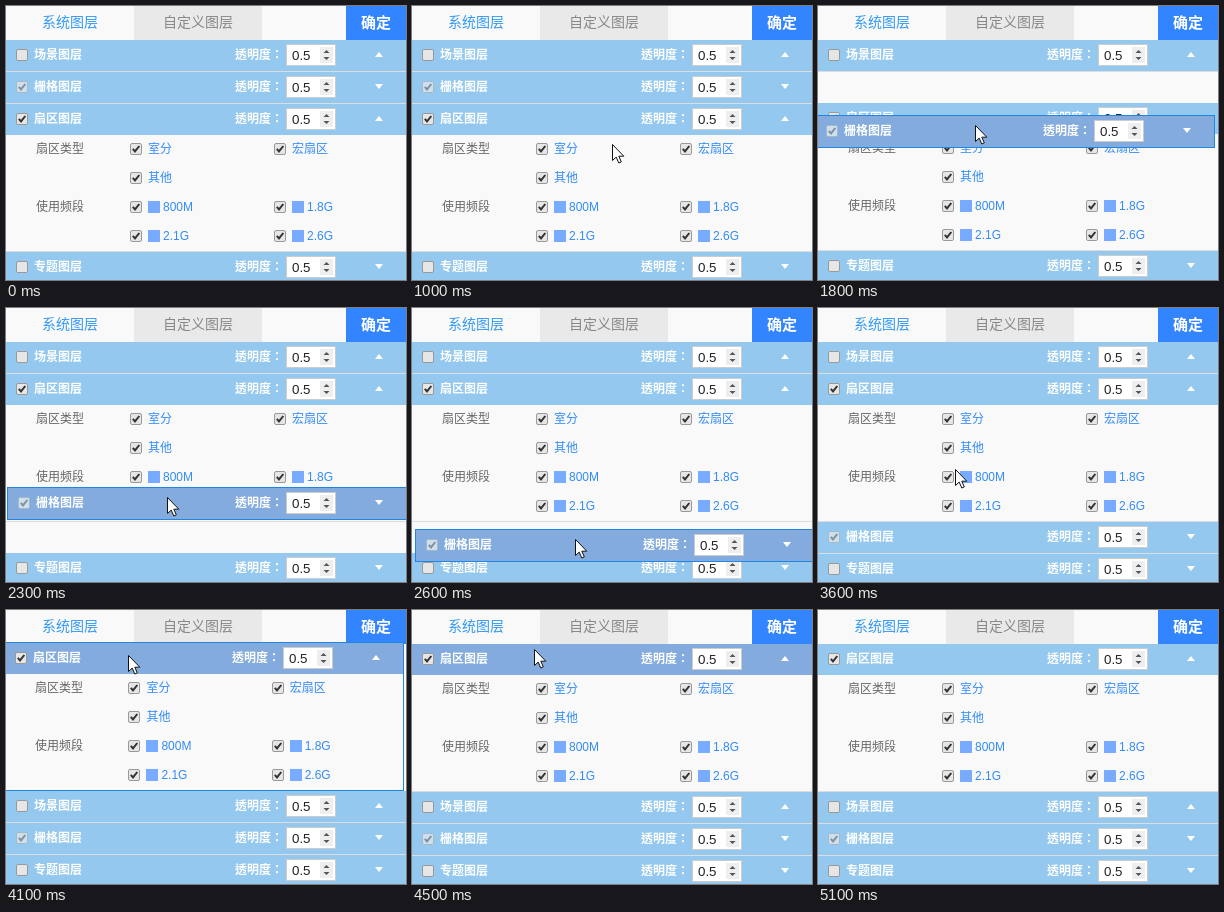
An HTML page for the animation above (5600 ms loop, 400 px wide and 274 px high).

```html
<!DOCTYPE html>
<html lang="zh-CN">
<head>
<meta charset="utf-8">
<style>
html, body { margin: 0; width: 100%; height: 100%; overflow: hidden; }
body { background: #f9f9f9; font: 12px "Liberation Sans", "Noto Sans CJK SC", sans-serif; }
#stage { position: relative; width: 400px; height: 274px; overflow: hidden; cursor: default; }
#stage * { position: absolute; box-sizing: border-box; white-space: nowrap; }
.tab { top: 0; height: 34px; line-height: 33px; text-align: center; font-size: 14px; }
.item { width: 400px; border-bottom: 1px solid #ddd; background: #f9f9f9; }
.head { left: 0; right: 0; top: 0; height: 31px; line-height: 31px; background: #94c8ee; color: #fff; font-weight: bold; }
.hover .head { background: #83abdd; }
.drag { border: 1px solid #2286e0; z-index: 1; }
.name { left: 28px; }
.alpha { right: 123px; }
.num { right: 70px; top: 4px; width: 50px; height: 22px; border: 1px solid #ccc; background: #fff;
  color: #222; font: 13.33px/21px "Liberation Sans", sans-serif; padding-left: 5px; }
.spin { right: 2px; top: 2px; width: 13px; height: 16px; background: #eee; }
.fold { right: 23px; top: 12px; width: 8px; height: 5px; fill: #fff; }
.panel { left: 0; right: 0; top: 31px; height: 116px; line-height: 29px; color: #666; }
.opt { color: #338cf5; height: 29px; }
.chip { left: 18px; top: 8px; width: 12px; height: 12px; background: #76abff; }
.box { width: 12px; height: 12px; }
#cursor { width: 14px; height: 21px; z-index: 2; }
</style>
</head>
<body>
<div id="stage">
  <div class="tab" style="left:0;width:128px;color:#3399f3">系统图层</div>
  <div class="tab" style="left:128px;width:128px;background:#e9e9e9;color:#888">自定义图层</div>
  <div class="tab" style="left:340px;width:60px;background:#3385ff;color:#fff;font-size:15px;font-weight:bold">确定</div>
  <svg id="cursor" viewBox="-.5 -.5 14 21"><path d="M0 0V16L3.7 12.6 6.3 18.5 8.8 17.4 6.3 11.7H11.3Z" fill="#fff" stroke="#111"/></svg>
</div>
<script>
const stage = document.getElementById('stage'), cursor = document.getElementById('cursor');
const LOOP = 5600, STEP = 100, TOP = 34, HEAD = 31, LINE = 29;

const box = (x, y, on, off) => `<svg class="box" style="left:${x}px;top:${y}px" viewBox="0 0 12 12">
  <rect x=".5" y=".5" width="11" height="11" rx="1.5" fill="${off ? '#cfdfeb' : '#e6e6e6'}" stroke="${off ? '#a3b9c9' : '#999'}"/>
  ${on ? `<path d="M2.8 5.8L5 8.4 9.3 3" fill="none" stroke="${off ? '#7f919e' : '#333'}" stroke-width="2"/>` : ''}</svg>`;

// Options fill two columns; the bands in the lower rows carry a colour chip
const options = ['室分', '宏扇区', '其他', '', '800M', '1.8G', '2.1G', '2.6G'];
const option = (text, i) => text && `<div class="opt" style="left:${i % 2 ? 67 : 31}%;top:${(i >> 1) * LINE}px">
  ${box(0, 8, true)}${i > 3 ? '<i class="chip"></i>' : ''}<span style="left:${i > 3 ? 33 : 18}px">${text}</span></div>`;
const panel = `<div class="panel"><span style="left:30px">扇区类型</span>
  <span style="left:30px;top:${2 * LINE}px">使用频段</span>${options.map(option).join('')}</div>`;

function item(name, { on, off, up, open }) {
  const el = document.createElement('div');
  el.size = HEAD + (open ? 4 * LINE : 0);
  el.innerHTML = `<div class="head">${box(10, 9, on, off)}<span class="name">${name}</span>
    <span class="alpha" lang="zh-TW">透明度：</span>
    <div class="num">0.5<svg class="spin" viewBox="0 0 13 16"><path d="M3.5 6L6.5 3 9.5 6ZM3.5 10H9.5L6.5 13Z" fill="#555"/></svg></div>
    <svg class="fold" viewBox="0 0 8 5"><path d="${up ? 'M0 5L4 0 8 5Z' : 'M0 0H8L4 5Z'}"/></svg></div>${open ? panel : ''}`;
  stage.append(el);
  return el;
}

const scene = item('场景图层', { up: true });
const grid = item('栅格图层', { on: true, off: true });
const sector = item('扇区图层', { on: true, up: true, open: true });
const topic = item('专题图层', {});

// Pointer waypoints: time, x, y; a time alone means it rests until then
const path = [[0, 402, 170], [400], [1000, 200, 138], [1200, 160, 76], [1400], [1800, 157, 119], [2600, 163, 231],
  [2800, 163, 241], [3300], [3600, 137, 161], [3800, 124, 79], [3900], [4100, 122, 45], [4300, 122, 39],
  [4500], [5000, 402, 39], [5100, 402, -20]];
path.forEach((p, i) => { if (i && p.length < 2) p.push(...path[i - 1].slice(1)); });

// A dragged item follows the pointer, held at the point where it was grabbed
const drags = [
  { el: grid, from: 1500, to: 3100, grab: [160, 10] },
  { el: sector, from: 4000, to: 4500, grab: [124, 13] }
];

function pointerAt(t) {
  const i = path.findIndex(p => p[0] > t);
  if (i < 0) return path[path.length - 1].slice(1);
  const [t0, ...a] = path[i - 1], [t1, ...b] = path[i];
  return a.map((v, n) => Math.round(v + (b[n] - v) * (t - t0) / (t1 - t0)));
}

function place(el, [x, y]) {
  el.style.left = x + 'px';
  el.style.top = y + 'px';
}

function draw(t) {
  const mouse = pointerAt(t);
  const drag = drags.find(d => t >= d.from && t < d.to);
  const order = t < 2200 ? [scene, grid, sector, topic]
    : t < 4100 ? [scene, sector, grid, topic] : [sector, scene, grid, topic];
  let y = TOP;
  for (const el of order) {
    const held = drag && drag.el === el;
    const over = !drag && mouse[1] >= y && mouse[1] < y + HEAD;
    el.className = 'item' + (held ? ' drag hover' : over ? ' hover' : '');
    el.style.height = el.size + (held ? 2 : 1) + 'px';
    place(el, held ? mouse.map((v, n) => v - drag.grab[n]) : [0, y]);
    y += el.size + (held ? 0 : 1); // the gap left behind has no border
  }
  place(cursor, mouse);
}

const start = performance.now();
function tick() {
  const t = (performance.now() - start) % LOOP;
  draw(Math.floor(t / STEP) * STEP);
  requestAnimationFrame(tick);
}
tick();
</script>
</body>
</html>
```
